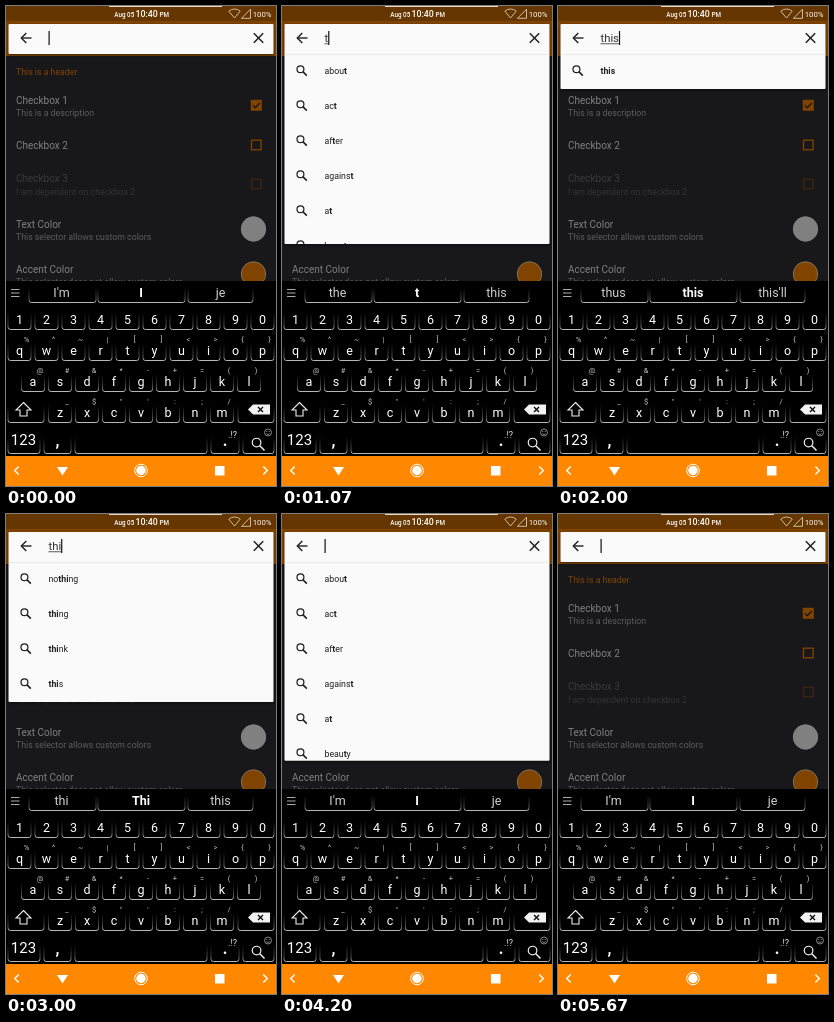
Write an HTML page with a canvas that moves like this. It is 270 px wide and 480 px high and loops after 5.74 s.

```html
<!DOCTYPE html>
<html lang="en">
<head>
<meta charset="utf-8">
<title>Search suggestions</title>
<style>
html, body { margin: 0; width: 100%; height: 100%; overflow: hidden; background: #000; }
canvas { display: block; width: 270px; height: 480px; }
</style>
</head>
<body>
<canvas id="stage"></canvas>
<script>
const W = 270, H = 480, LOOP = 5740;
const ORANGE = '#ff8800', DIM_ORANGE = '#804400', INK = '#202022';
const BAR_TOP = 18, BAR_BOTTOM = 48, ROW = 35, MAX_BOTTOM = 251;

const words = {
  '': [],
  t: ['about', 'act', 'after', 'against', 'at', 'beauty'],
  th: ['both', 'earth', 'father', 'mother', 'north', 'nothing'],
  thi: ['nothing', 'thing', 'think', 'this'],
  this: ['this']
};
const hints = {
  '': ["I'm", 'I', 'je'],
  t: ['the', 't', 'this'],
  th: ['th', 'Th', 'the'],
  thi: ['thi', 'Thi', 'this'],
  this: ['thus', 'this', "this'll"]
};
// The moment each query appears; every step also restarts the cursor blink.
const steps = [
  [0, ''], [820, 't'], [1300, 'th'], [1560, 'thi'], [1760, 'this'],
  [2700, 'thi'], [3080, 'th'], [3700, 't'], [4190, '']
];

const canvas = document.getElementById('stage');
const ctx = canvas.getContext('2d');
const dpr = window.devicePixelRatio || 1;
canvas.width = W * dpr;
canvas.height = H * dpr;

function rect(x, y, w, h, color) {
  ctx.fillStyle = color;
  ctx.fillRect(x, y, w, h);
}

function disc(x, y, r, color) {
  ctx.fillStyle = color;
  ctx.beginPath();
  ctx.arc(x, y, r, 0, Math.PI * 2);
  ctx.fill();
}

function ring(x, y, r, color, width) {
  ctx.strokeStyle = color;
  ctx.lineWidth = width;
  ctx.beginPath();
  ctx.arc(x, y, r, 0, Math.PI * 2);
  ctx.stroke();
}

function line(points, color, width, closed) {
  ctx.strokeStyle = color;
  ctx.lineWidth = width;
  ctx.beginPath();
  points.forEach(([x, y]) => ctx.lineTo(x, y));
  if (closed) ctx.closePath();
  ctx.stroke();
}

function shape(points, color) {
  ctx.fillStyle = color;
  ctx.beginPath();
  points.forEach(([x, y]) => ctx.lineTo(x, y));
  ctx.fill();
}

function text(str, x, y, size, color, align = 'left', weight = 400) {
  ctx.font = `${weight} ${size}px Roboto, sans-serif`;
  ctx.textAlign = align;
  ctx.fillStyle = color;
  ctx.fillText(str, x, y);
  return ctx.measureText(str).width;
}

function magnifier(x, y, r, color, width) {
  ring(x - r * 0.45, y - r * 0.45, r, color, width);
  line([[x + r * 0.3, y + r * 0.3], [x + r * 1.4, y + r * 1.4]], color, width * 1.3);
}

function statusBar() {
  rect(0, 0, W, 15, '#663600');
  rect(0, 15, W, 35, DIM_ORANGE);
  rect(103, 0, 113, 1, '#e8d8c8');
  text('Aug 05', 108.3, 11, 6.3, '#fff', 'left', 500);
  text('10:40', 129.5, 11.2, 8.8, '#fff', 'left', 500);
  text('PM', 153.5, 11.2, 6.3, '#fff', 'left', 500);
  line([[222.8, 5.2], [225.3, 3.6], [228.5, 3], [231.7, 3.6], [234.2, 5.2], [228.5, 12]],
    '#e8ddd0', 0.8, true);
  line([[235.5, 12.3], [244.5, 12.3], [244.5, 3.2]], '#e8ddd0', 0.8, true);
  text('100%', 265.5, 10.8, 7.8, '#fff', 'right');
}

function checkbox(y, color, checked) {
  if (checked) {
    rect(244.8, y - 5.5, 11, 11, color);
    line([[247, y + 0.2], [249.3, y + 2.5], [253.8, y - 2.3]], '#18181a', 1.3);
  } else {
    ctx.strokeStyle = color;
    ctx.lineWidth = 1.3;
    ctx.strokeRect(245.5, y - 4.8, 9.6, 9.6);
  }
}

function swatch(y, color) {
  disc(247.5, y, 12.5, color);
  ring(247.5, y, 12.2, '#808080', 0.7);
}

function settings() {
  rect(0, 50, W, 226, '#18181a');
  text('This is a header', 10, 69.3, 8.75, DIM_ORANGE);
  const row = (title, y, note, hi = '#808080', lo = '#5c5c5d') => {
    text(title, 10, y, 10, hi);
    if (note) text(note, 10, y + 12.2, 8.75, lo);
  };
  row('Checkbox 1', 97.5, 'This is a description');
  row('Checkbox 2', 143);
  row('Checkbox 3', 176.3, 'I am dependent on checkbox 2', '#3a3a3b', '#333334');
  row('Text Color', 221.6, 'This selector allows custom colors');
  row('Accent Color', 267, 'This selector does not allow custom colors');
  checkbox(99.3, DIM_ORANGE, true);
  checkbox(139, DIM_ORANGE);
  checkbox(178, '#3d260f');
  swatch(223, '#808080');
  swatch(268, DIM_ORANGE);
}

// Writes a word with the matching part in bold.
function suggestion(word, query, y) {
  magnifier(20, y - 0.7, 3.45, INK, 1.25);
  const at = query ? word.indexOf(query) : -1;
  const parts = at < 0 ? [word, '', '']
    : [word.slice(0, at), query, word.slice(at + query.length)];
  let x = 42.5;
  parts.forEach((part, i) => {
    x += text(part, x, y + 2.8, 8.75, INK, 'left', i === 1 ? 700 : 400);
  });
}

const bottomFor = q => Math.min(BAR_BOTTOM + words[q].length * ROW, MAX_BOTTOM);

function searchCard(query, before, age) {
  const from = bottomFor(before), to = bottomFor(query);
  const p = Math.min(age / (to > from ? 300 : 120), 1);
  const bottom = from + (to - from) * (0.5 - 0.5 * Math.cos(Math.PI * p));
  const shown = query === '' && p < 1 ? before : query;

  ctx.save();
  ctx.shadowColor = 'rgba(0,0,0,.55)';
  ctx.shadowBlur = 3 * dpr;
  ctx.shadowOffsetY = dpr;
  ctx.fillStyle = '#fafafa';
  ctx.beginPath();
  ctx.roundRect(2.5, BAR_TOP, 265, bottom - BAR_TOP, 1);
  ctx.fill();
  ctx.restore();

  if (bottom > BAR_BOTTOM) {
    ctx.save();
    ctx.beginPath();
    ctx.rect(2.5, BAR_BOTTOM, 265, bottom - BAR_BOTTOM);
    ctx.clip();
    rect(2.5, BAR_BOTTOM, 265, 0.7, '#e2e2e2');
    words[shown].forEach((w, i) => suggestion(w, shown, BAR_BOTTOM + ROW * (i + 0.5)));
    ctx.restore();
  }

  line([[25.5, 32], [15.5, 32]], INK, 1.4);
  line([[20.3, 27], [15.3, 32], [20.3, 37]], INK, 1.4);
  line([[247.8, 27.2], [257.2, 36.8]], INK, 1.5);
  line([[257.2, 27.2], [247.8, 36.8]], INK, 1.5);

  const width = text(query, 42.5, 36, 11.25, '#333');
  if (query) rect(42.5, 37.4, width, 0.8, '#333');
  if (age % 1000 < 500) rect(42.5 + width, 25, 1.2, 14, '#111');
}

// Lower key edge: bright at the bottom, fading out up the sides.
function keyEdge(x1, x2, bottom, height = 17) {
  const fade = ctx.createLinearGradient(0, bottom - height, 0, bottom);
  fade.addColorStop(0, 'rgba(170,170,170,0)');
  fade.addColorStop(0.75, 'rgba(170,170,170,.45)');
  fade.addColorStop(1, 'rgba(215,215,215,.85)');
  ctx.strokeStyle = fade;
  ctx.lineWidth = 1;
  ctx.beginPath();
  ctx.moveTo(x1, bottom - height);
  ctx.arcTo(x1, bottom, x1 + 4, bottom, 2.5);
  ctx.arcTo(x2, bottom, x2, bottom - 4, 2.5);
  ctx.lineTo(x2, bottom - height);
  ctx.stroke();
}

function keyRow(keys, marks, x, y) {
  [...keys].forEach((k, i) => {
    const cx = x + 27 * i;
    keyEdge(cx - 11.5, cx + 11.5, y + 10.5);
    text(k, cx, y + 4.5, 12.5, '#fff', 'center');
    if (marks) text(marks[i], cx + 7, y - 8.5, 7.5, '#c4c4c4', 'center');
  });
}

function keyboard(query) {
  rect(0, 275, W, 175, '#000');
  [283.5, 287, 290.5].forEach(y => line([[5, y], [13.5, y]], '#aaa', 1));
  [[23, 90], [92, 179], [182, 247]].forEach(([a, b], i) => {
    keyEdge(a, b, 296.5, 15);
    const mid = i === 1;
    text(hints[query][i], [55.5, 135, 214.5][i], 291, 12.5,
      mid ? '#fff' : '#d0d0d0', 'center', mid ? 700 : 400);
  });

  keyRow('1234567890', '', 13.5, 313);
  keyRow('qwertyuiop', '%^~|[]<>{}', 13.5, 344);
  keyRow('asdfghjkl', '@#&*-+=()', 27, 375);
  keyRow('zxcvbnm', '_$"\':;/', 54, 406);

  keyEdge(2, 38, 416.5);
  line([[17.5, 396.5], [25, 404], [21, 404], [21, 410],
    [14, 410], [14, 404], [10, 404]], '#eee', 1.1, true);
  keyEdge(232, 268, 416.5);
  shape([[242, 403.5], [247, 398.5], [264, 398.5], [264, 408.5], [247, 408.5]], '#f2f2f2');
  line([[252, 401], [257, 406]], '#000', 1.3);
  line([[257, 401], [252, 406]], '#000', 1.3);

  [[2, 34], [38, 65], [69, 201], [205, 233], [237, 268]]
    .forEach(([a, b]) => keyEdge(a, b, 447.5));
  text('123', 17.5, 439.3, 15, '#fff', 'center');
  text(',', 51.5, 440, 16, '#fff', 'center', 700);
  text('.', 219, 440, 16, '#fff', 'center', 700);
  text('.!?', 226.5, 432, 9, '#ddd', 'center');
  magnifier(252.5, 438.5, 4.3, '#eee', 1.2);
  ring(262, 426.5, 3.5, '#bbb', 0.7);
  disc(260.8, 425.6, 0.5, '#bbb');
  disc(263.2, 425.6, 0.5, '#bbb');
  line([[260.3, 427.6], [262, 428.6], [263.7, 427.6]], '#bbb', 0.7);
}

function navBar() {
  rect(0, 450, W, 30, ORANGE);
  line([[12.7, 460.5], [8.7, 464.5], [12.7, 468.5]], '#fff', 1.4);
  line([[257.3, 460.5], [261.3, 464.5], [257.3, 468.5]], '#fff', 1.4);
  shape([[51, 461], [62, 461], [56.5, 469.5]], '#fff');
  disc(135, 464.5, 4.7, '#fff');
  ring(135, 464.5, 6.3, '#fff', 1);
  rect(209, 460, 9.5, 9.5, '#fff');
}

function draw(now) {
  const t = now % LOOP;
  let i = steps.length - 1;
  while (steps[i][0] > t) i--;
  const [start, query] = steps[i];
  const before = i ? steps[i - 1][1] : '';

  ctx.setTransform(dpr, 0, 0, dpr, 0, 0);
  statusBar();
  settings();
  searchCard(query, before, t - start);
  keyboard(query);
  navBar();
}

const begin = performance.now();
function tick() {
  draw(Math.max(0, performance.now() - begin));
  requestAnimationFrame(tick);
}
tick();
</script>
</body>
</html>
```
